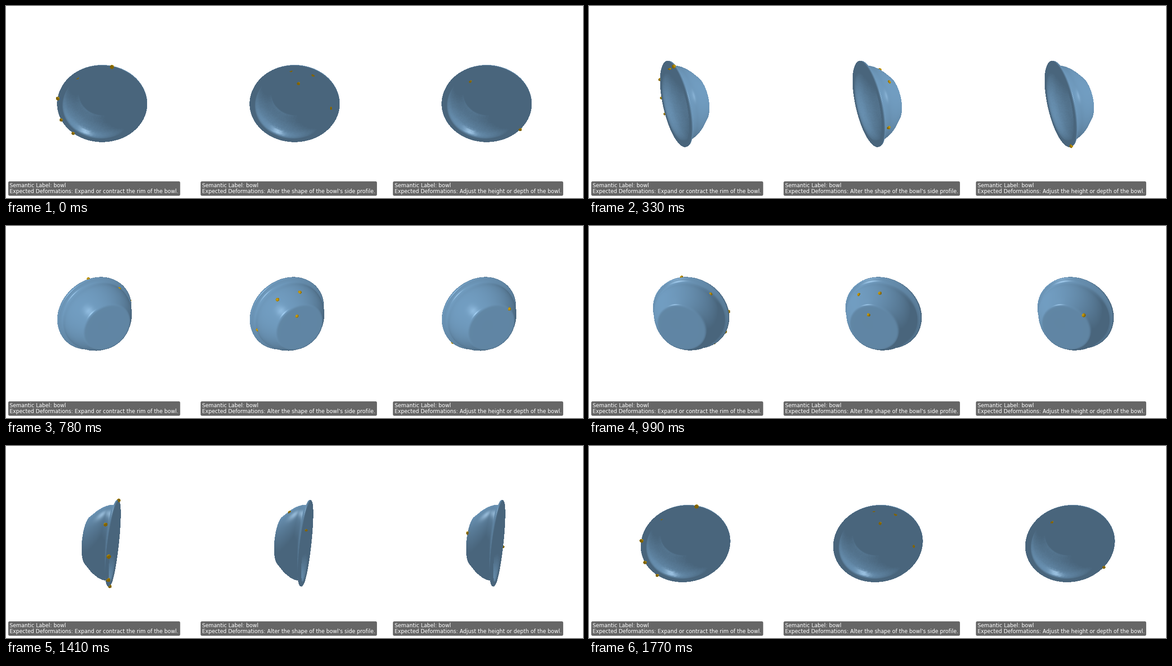
These frames come from a looping animation (1280x427 px, 1.8 s). A matplotlib script:

```python
import numpy as np
import matplotlib.pyplot as plt
from matplotlib.animation import FuncAnimation
from matplotlib.patches import FancyBboxPatch

W, H, DPI = 1280, 427, 64
FRAMES, STEP_MS = 60, 30
PANEL = W / 3
CX, CY = PANEL / 2, H / 2
FOCAL = CY / np.tan(np.radians(30))     # 60 degree view, camera at distance 1
SIN_E, COS_E = 0.5, np.sqrt(0.75)       # camera raised by 30 degrees
X0, X1, Y0, Y1 = 103, 324, 103, 324     # window of the first panel to render

# Object axes: u (sideways), z (up), n (out of the bowl's opening)
LIGHT = np.array([1, 1, -1]) / np.sqrt(3)
BLUE = np.array([73, 101, 124.0])
GOLD = np.array([128, 99, 4.0])
THICK, BALL_R, RIM = 0.004, 0.0099, 1.0

# Each panel: its text, and its balls as (angle, path length from the base centre)
PANELS = [
    ("Expand or contract the rim of the bowl.",
     [(79, RIM), (164, RIM), (197, RIM), (224.5, RIM), (127, .292)]),
    ("Alter the shape of the bowl's side profile.",
     [(96, .2185), (58, .2265), (-5.5, .285), (74.5, .0885)]),
    ("Adjust the height or depth of the bowl.",
     [(135, .144), (-35.7, RIM)]),
]


def vertex_normals(pts):
    d = np.diff(pts, axis=0)
    d /= np.linalg.norm(d, axis=1)[:, None]
    seg = np.column_stack([d[:, 1], -d[:, 0]])
    nrm = np.vstack([seg[:1], seg[:-1] + seg[1:], seg[-1:]])
    return nrm / np.linalg.norm(nrm, axis=1)[:, None]


def cut_corners(pts):
    a, b = pts[:-1], pts[1:]
    mid = np.stack([.75 * a + .25 * b, .25 * a + .75 * b], axis=1).reshape(-1, 2)
    return np.vstack([pts[:1], mid[1:-1], pts[-1:]])


# Key points of the outline as (radius, height); the inside is the outside moved inwards
OUTER = np.array([(0, -.0826), (.130, -.083), (.144, -.0825), (.153, -.0715),
                  (.192, -.028), (.219, .022), (.222, .063)])
LIP = np.array([(.250, .066), (.2502, .081), (.224, .0815)])
INNER = (OUTER - THICK * vertex_normals(OUTER))[::-1]
PROFILE = cut_corners(np.vstack([OUTER, LIP, INNER]))
NORMALS = vertex_normals(PROFILE)
INNER_START = 2 * (len(OUTER) + len(LIP)) - 1


def ball_centers(balls):
    skin = cut_corners(np.vstack([OUTER, LIP[:2]]))
    skin = skin - THICK / 2 * vertex_normals(skin)
    length = np.append(0, np.cumsum(np.linalg.norm(np.diff(skin, axis=0), axis=1)))
    for angle, s in balls:
        r, h = (np.interp(s, length, skin[:, i]) for i in (0, 1))
        a = np.radians(angle)
        yield np.array([r * np.cos(a), r * np.sin(a), h])


CENTERS = [list(ball_centers(balls)) for _, balls in PANELS]
GRID_X, GRID_Y = np.meshgrid((np.arange(X0, X1) + 0.5 - CX) / FOCAL,
                             (CY - np.arange(Y0, Y1) - 0.5) / FOCAL)


def to_object(x, y, z, a):
    return x * np.cos(a) + y * np.sin(a), z, -x * np.sin(a) + y * np.cos(a)


def camera_rays(a):
    eye = np.array(to_object(0.0, COS_E, SIN_E, a))
    rays = to_object(GRID_X, -GRID_Y * SIN_E - COS_E, GRID_Y * COS_E - SIN_E, a)
    return eye, np.stack(rays, axis=-1)


def shade(nrm, rays, color, gloss):
    view = -rays / np.linalg.norm(rays, axis=-1, keepdims=True)
    lit = nrm @ LIGHT
    mirror = 2 * lit * (nrm * view).sum(-1) - view @ LIGHT
    spec = np.where(lit > 0, np.clip(mirror, 0, 1) ** 34, 0)
    lit = np.clip(lit, 0, 1)
    return color * (1 + 0.56 * lit[..., None]) + gloss * spec[..., None]


def hit_bowl(eye, rays):
    """Nearest hit of every ray with the cone pieces of the bowl."""
    du, dz, dn = np.moveaxis(rays, -1, 0)
    flat = du ** 2 + dz ** 2
    cross = eye[0] * du + eye[1] * dz
    near = np.full(du.shape, np.inf)
    piece = np.zeros(du.shape, int)
    for i, ((r0, h0), (r1, h1)) in enumerate(zip(PROFILE[:-1], PROFILE[1:])):
        m = (r1 - r0) / (h1 - h0)
        g = r0 + m * (eye[2] - h0)
        qa = flat - (m * dn) ** 2
        qb = cross - m * g * dn
        root = np.sqrt(qb ** 2 - qa * (eye[0] ** 2 + eye[1] ** 2 - g ** 2))
        lo, hi = min(h0, h1) - 1e-9, max(h0, h1) + 1e-9
        for t in ((-qb - root) / qa, (-qb + root) / qa):
            h = eye[2] + t * dn
            ok = (h >= lo) & (h <= hi) & (t > 0) & (t < near)
            near[ok] = t[ok]
            piece[ok] = i
    return near, piece


def bowl_colors(eye, rays, near, piece):
    pos = eye + near[:, None] * rays
    h0, h1 = PROFILE[piece, 1], PROFILE[piece + 1, 1]
    w = ((pos[:, 2] - h0) / (h1 - h0))[:, None]
    slope = NORMALS[piece] * (1 - w) + NORMALS[piece + 1] * w
    phi = np.arctan2(pos[:, 1], pos[:, 0])
    # The inside of the bowl is slightly uneven
    bump = (np.sin(37 * phi + 3 * np.sin(210 * pos[:, 2]))
            * np.sin(300 * pos[:, 2] + 4 * np.sin(9 * phi)))
    bump = np.where(piece >= INNER_START, 0.05 * bump, 0)
    nrm = np.column_stack([slope[:, 0] * np.cos(phi), slope[:, 0] * np.sin(phi),
                           slope[:, 1] + bump])
    nrm /= np.linalg.norm(nrm, axis=1)[:, None]
    return shade(nrm, rays, BLUE, 54)


def add_ball(img, depth, eye, rays, center):
    off = eye - center
    qa = (rays ** 2).sum(-1)
    qb = rays @ off
    disc = qb ** 2 - qa * (off @ off - BALL_R ** 2)
    t = (-qb - np.sqrt(disc)) / qa
    seen = (disc > 0) & (t < depth)
    nrm = (off + t[seen][:, None] * rays[seen]) / BALL_R
    img[seen] = shade(nrm, rays[seen], GOLD, 25)
    depth[seen] = t[seen]


def render(k):
    eye, rays = camera_rays(2 * np.pi * k / FRAMES)
    canvas = np.full((H, W, 3), 255, np.uint8)
    with np.errstate(all="ignore"):
        near, piece = hit_bowl(eye, rays)
        on = np.isfinite(near)
        bowl = np.full(near.shape + (3,), 255.0)
        bowl[on] = bowl_colors(eye, rays[on], near[on], piece[on])
        for p, centers in enumerate(CENTERS):
            img, depth = bowl.copy(), near.copy()
            for center in centers:
                add_ball(img, depth, eye, rays, center)
            left = X0 + round(p * PANEL)
            canvas[Y0:Y1, left:left + X1 - X0] = np.clip(img, 0, 255)
    return canvas


cache = {}


def update(k):
    if k not in cache:
        cache[k] = render(k)
    stage.set_data(cache[k])
    return [stage]


plt.rcParams["font.family"] = "DejaVu Sans"
fig = plt.figure(figsize=(W / DPI, H / DPI), dpi=DPI, facecolor="white")
ax = fig.add_axes([0, 0, 1, 1])
ax.axis("off")
stage = ax.imshow(np.full((H, W, 3), 255, np.uint8), extent=(0, W, H, 0),
                  interpolation="nearest", aspect="auto")
ax.set_xlim(0, W)
ax.set_ylim(H, 0)

for p, (text, _) in enumerate(PANELS):
    left = 5 + p * PANEL
    for y, line in ((403, "Semantic Label: bowl"),
                    (416.3, "Expected Deformations: " + text)):
        label = ax.text(left + 3.3, y, line, color="white", fontsize=13.15,
                        va="baseline", zorder=3)
    width = label.get_window_extent().width + 7
    ax.add_patch(FancyBboxPatch((left, 390), width, 32, fc="#666666", ec="none",
                                boxstyle="round,pad=0,rounding_size=3", zorder=2))

anim = FuncAnimation(fig, update, frames=FRAMES, interval=STEP_MS,
                     repeat=True, repeat_delay=0)
plt.show()
```
